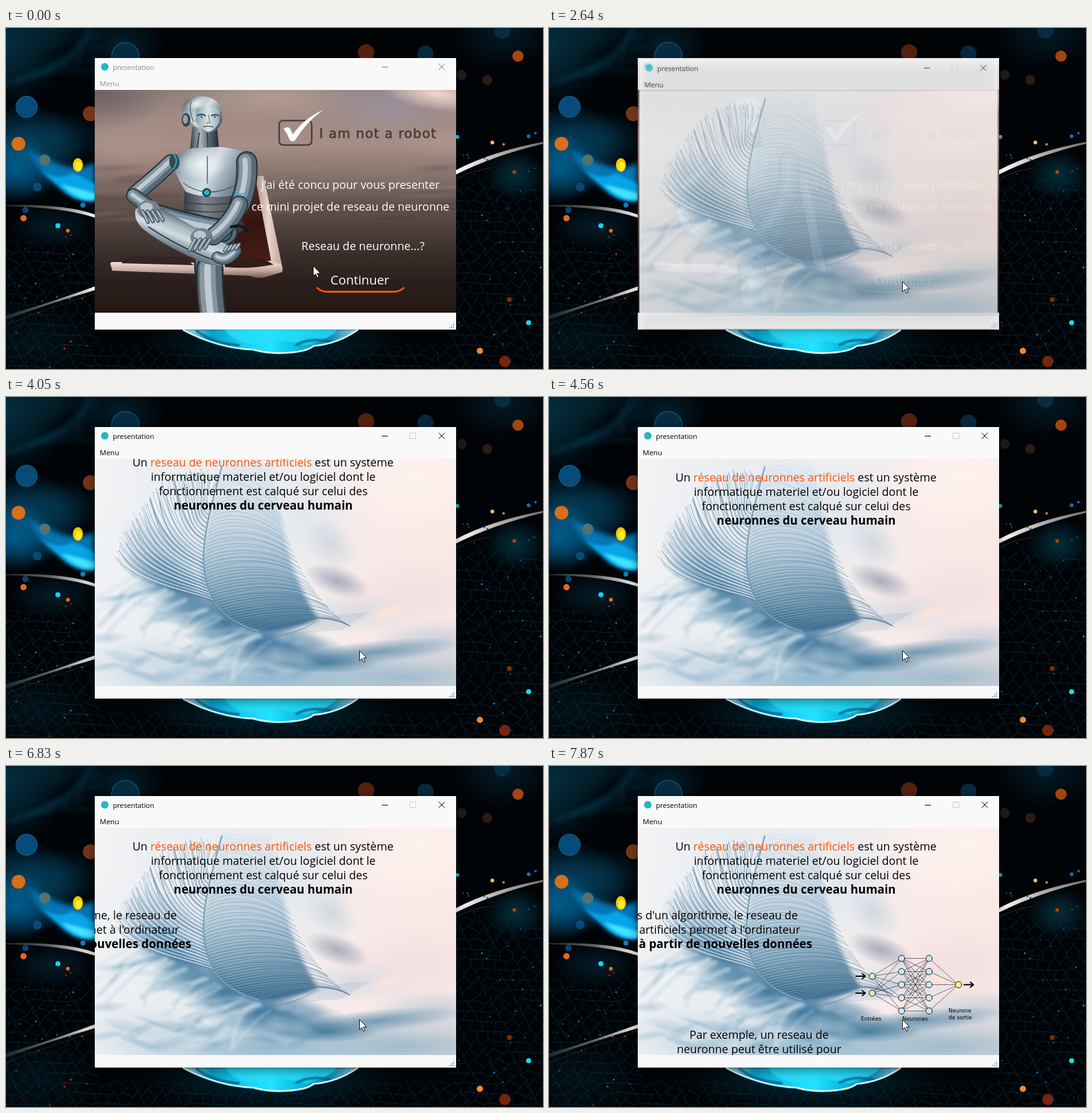
These frames come from a looping animation (859 by 545 pixels, 8 s). An HTML page with a canvas:

```html
<!DOCTYPE html>
<html lang="fr">
<head>
<meta charset="utf-8">
<title>presentation</title>
<style>
html, body { margin: 0; width: 100%; height: 100%; overflow: hidden; background: #020509; }
canvas { display: block; }
</style>
</head>
<body>
<canvas id="stage" width="859" height="545"></canvas>
<script>
const W = 859, H = 545, LOOP = 8000;
const SANS = '"Open Sans", "Noto Sans", sans-serif';
const WIDE = '"DejaVu Sans", sans-serif';
const view = document.getElementById('stage').getContext('2d');
let g = view;

const STEPS = [0, 140, 260, 380, 530, 1400, 1530, 1680, 2520, 2640, 2760, 2880, 3000, 3120, 3270,
  3390, 3510, 3660, 3810, 3930, 4050, 4200, 4320, 4440, 4560, 5650, 5800, 5920, 6040, 6190, 6310,
  6430, 6550, 6670, 6830, 6970, 7090, 7240, 7360, 7480, 7630, 7750, 7870];

function layer(paint) {
  const c = document.createElement('canvas');
  c.width = W; c.height = H;
  g = c.getContext('2d');
  paint();
  g = view;
  return c;
}
function seeded(s) {
  return () => (s = (s * 16807) % 2147483647) / 2147483647;
}
function fill(d, color) { g.fillStyle = color; g.fill(new Path2D(d)); }
function line(d, color, w = 1) {
  g.strokeStyle = color; g.lineWidth = w; g.lineCap = g.lineJoin = 'round';
  g.stroke(new Path2D(d));
}
function blurred(px, paint) {
  g.save(); g.filter = `blur(${px}px)`;
  paint();
  g.restore();
}
function disc(x, y, r, color, ry = r) {
  g.fillStyle = color;
  g.beginPath(); g.ellipse(x, y, r, ry, 0, 0, 7); g.fill();
}
// Soft ellipse; rgb is "r,g,b"
function glow(x, y, rx, ry, rgb, a = 1, rot = 0) {
  g.save();
  g.translate(x, y); g.rotate(rot); g.scale(rx, ry);
  const s = g.createRadialGradient(0, 0, 0, 0, 0, 1);
  s.addColorStop(0, `rgba(${rgb},${a})`);
  s.addColorStop(.5, `rgba(${rgb},${a * .55})`);
  s.addColorStop(1, `rgba(${rgb},0)`);
  g.fillStyle = s; g.fillRect(-1, -1, 2, 2);
  g.restore();
}
function ramp(x0, y0, x1, y1, ...colors) {
  const s = g.createLinearGradient(x0, y0, x1, y1);
  colors.forEach((c, i) => s.addColorStop(i / (colors.length - 1), c));
  return s;
}
function text(str, x, y, size, color = '#000', align = 'left', font = SANS, weight = 400) {
  g.font = `${weight} ${size}px ${font}`;
  g.fillStyle = color; g.textAlign = align;
  g.fillText(str, x, y);
}
function clipTo(x, y, w, h) { g.beginPath(); g.rect(x, y, w, h); g.clip(); }
function bez(a, b, c, d, u) {
  const v = 1 - u;
  return [0, 1].map(i => v*v*v*a[i] + 3*v*v*u*b[i] + 3*v*u*u*c[i] + u*u*u*d[i]);
}

// Honeycomb, warped so that neighbouring cells share their corners
function paintCells() {
  const r = 11;
  for (let row = 0; row < 20; row++) for (let c = 0; c < 46; c++) {
    const x = (c + (row % 2) / 2) * r * 1.732, y = 235 + row * r * 1.5;
    if (x < 150 ? y < 335 : x > 710 ? y < 240 : y < 500) continue;
    let d = '';
    for (let k = 0; k < 6; k++) {
      const a = (k + .5) * Math.PI / 3, px = x + Math.cos(a) * r, py = y + Math.sin(a) * r;
      d += (k ? 'L' : 'M') + (px + 5 * Math.sin(px * .17 + py * .31)) + ' ' + (py + 4 * Math.sin(px * .29 - py * .13));
    }
    line(d + 'Z', 'rgba(12,58,76,.28)', 1.2);
  }
}

function paintWall() {
  const rnd = seeded(77);
  g.fillStyle = '#010407'; g.fillRect(0, 0, W, H);
  glow(0, 25, 100, 100, '4,62,86', .75);
  glow(70, 0, 90, 45, '4,45,62', .6);
  glow(30, 195, 90, 75, '4,82,122', .9);
  glow(15, 225, 70, 55, '0,105,160', .75);
  glow(85, 178, 70, 45, '4,58,84', .7);
  glow(185, 25, 70, 45, '3,40,56', .7);
  glow(75, 318, 70, 35, '3,38,54', .7);
  glow(815, 235, 50, 40, '6,58,76', .75);
  glow(795, 5, 80, 60, '4,42,58', .6);
  glow(40, 500, 110, 60, '3,26,36', .6);
  glow(425, 500, 210, 55, '2,45,62', .8);
  paintCells();
  blurred(4, () => {
    for (let i = 0; i < 6; i++)
      line(`M${-10 + i * 25} ${95 - i * 8}Q${60 + i * 10} ${60 - i * 4} 150 ${70 - i * 20}`, 'rgba(10,70,98,.3)', 7);
    fill('M35 195Q70 215 100 222Q125 225 142 215V278Q105 275 80 250Q55 235 35 195Z', '#0676b5');
  });
  blurred(2, () => {
    fill('M55 226Q85 246 106 232Q124 238 142 250V276Q112 279 92 260Z', '#08a4e8');
    fill('M88 250Q110 255 142 264V274Q116 278 88 250Z', '#43e4ff');
  });

  // light trails
  const pale = ramp(0, 0, 142, 0, '#17262f', '#5f6567', '#f5f2f0');
  blurred(.7, () => {
    fill('M0 283Q95 281 142 298V303Q88 286 0 285Z', pale);
    fill('M0 459Q62 442 142 413V419Q70 440 0 466Z', pale);
    line('M0 474Q70 448 142 424', 'rgba(80,80,82,.35)', 1);
    fill('M720 227Q775 198 859 182V185Q780 204 720 234Z', ramp(720, 0, 859, 0, '#ffffff', '#b3aead', '#77706e'));
    line('M720 241Q745 228 775 224', 'rgba(55,75,85,.4)', 1.5);
  });
  // crescent below the window
  blurred(1, () => {
    fill('M282 482Q335 513 395 515Q415 522 450 520Q482 518 492 509Q530 506 564 482Z',
      ramp(282, 0, 564, 0, '#b5dfea', '#079ec9', '#18c9f0', '#22e5ff', '#08b8df', '#0b87b4', '#9fd5df'));
    fill('M350 482Q365 505 400 505L440 499L480 507Q520 497 530 482Z', 'rgba(40,225,250,.75)');
    line('M305 484Q330 504 372 507M520 502Q490 494 465 506', 'rgba(0,82,120,.75)', 4);
  });
  line('M284 483Q340 512 396 514Q420 521 450 519Q482 517 492 508Q530 505 562 483', '#e6faff', 2.5);

  const blue = 'rgba(8,80,125,.85)', dim = 'rgba(6,48,70,.85)', rust = '#a4460f';
  const orbs = [
    [33, 126, 17, '#064b79'], [191, 45, 22, dim], [135, 137, 12, '#74361a'], [20, 185, 11, '#d96e1b'],
    [62, 211, 9, '#57716f'], [50, 254, 7, blue], [28, 304, 5, '#e2691a'], [83, 316, 4, '#12d2f5'],
    [99, 324, 3, '#f06a14'], [31, 291, 5, blue], [123, 283, 4, '#0d7fc0'], [576, 39, 13, '#54200e'],
    [671, 41, 13, dim], [794, 4, 13, dim], [819, 45, 9, rust], [770, 83, 8, '#2c1b15'],
    [729, 75, 8, '#211a18'], [778, 183, 3, '#ffc06a'], [796, 186, 2, '#d88642'], [836, 173, 3, '#0c73b5'],
    [847, 168, 2, '#0c73b5'], [722, 174, 3, '#0bbbe0'], [813, 230, 3, rust], [836, 471, 4, '#12dcf2'],
    [758, 516, 5, '#f08a30'], [798, 533, 9, '#7c230b'], [805, 434, 4, '#7a2b10']
  ];
  blurred(.6, () => {
    for (const [x, y, r, c] of orbs) {
      disc(x, y, r, c);
      if (r > 16) { g.strokeStyle = 'rgba(22,112,168,.6)'; g.lineWidth = 1.5; g.stroke(); }
    }
    disc(115, 219, 8, '#ffc800', 11);
    disc(116, 221, 5, '#fff02a', 7);
    for (let i = 0; i < 80; i++) {
      const side = i % 2, x = side ? 722 + rnd() * 137 : rnd() * 142;
      const y = side ? 200 + rnd() * 345 : 330 + rnd() * 215;
      disc(x, y, .5 + rnd() * 1.2, ['#a8441a', '#0d5f80', '#6b2f18', '#147896'][i % 4]);
    }
  });
}

function metal(x0, y0, x1, y1) {
  return ramp(x0, y0, x1, y1, '#4a5a66', '#a7b5be', '#d3dde3', '#7c8e9a', '#35434e');
}
function tube(d, w) {
  line(d, '#252e35', w);
  line(d, '#566a78', w * .88);
  g.save(); g.translate(-w * .08, -w * .08);
  line(d, '#8496a2', w * .58);
  line(d, '#bfcbd2', w * .24);
  g.restore();
}
function hand(x, y, dx) {
  disc(x, y, 18, '#72848f', 15);
  disc(x - 3, y - 4, 10, '#b9c6ce', 7);
  for (let i = 0; i < 4; i++)
    tube(`M${x - 10 + i * 8} ${y + 3}q${dx * 5} 7 ${dx * 9} ${17 - i}`, 6);
}

function paintRobot() {
  // chair
  fill('M398 240Q404 234 412 237L442 382L430 393L418 380Z', ramp(395, 0, 445, 0, '#9b8580', '#ead5cc', '#b79b93'));
  fill('M392 255L401 250L424 372L358 376Q372 310 392 255Z', ramp(380, 250, 410, 380, '#592a22', '#35130f', '#4a1f18'));
  fill('M167 377Q166 374 172 374L435 376Q444 378 442 390L412 399Q400 400 390 396L170 388Z',
    ramp(0, 374, 0, 400, '#efe0da', '#c7aba2', '#70564f'));
  fill('M185 376Q190 364 214 364L284 366L300 379Z', '#362320');
  fill('M350 376Q375 362 410 368L428 378Q390 386 350 382Z', '#321c18');
  // trunk and neck
  fill('M286 258L368 262Q370 290 384 322Q350 342 282 322Q284 290 286 258Z', ramp(284, 0, 384, 0, '#323c42', '#7b858b', '#555d62', '#272d31'));
  for (let y = 278; y < 318; y += 12) line(`M287 ${y}Q325 ${y + 8} 372 ${y}`, '#333b40', 1.5);
  fill('M298 158L338 162L341 196L294 198Z', ramp(296, 0, 340, 0, '#3c4850', '#a8b6bf', '#56646e', '#242c32'));
  line('M309 168L306 192M322 168L323 192', '#344049', 2);
  fill('M262 207Q282 198 298 192L342 190Q376 193 396 205L384 242Q376 263 362 268Q320 274 288 262Q273 240 262 207Z', metal(258, 195, 396, 265));
  glow(313, 218, 40, 26, '248,251,252', .85);
  line('M322 205V248M284 248Q300 260 320 262Q345 264 374 248', '#52636e', 1.5);
  disc(321, 263, 7, '#27343c'); disc(321, 263, 4.5, '#17b7d8');
  // legs
  tube('M350 326Q318 344 322 385', 42);
  tube('M326 385Q325 420 332 470', 44);
  line('M315 390Q309 425 316 455', '#b7926f', 2);
  tube('M344 324Q300 318 240 300', 38);
  fill('M207 290Q225 276 245 286Q300 318 360 350L352 378Q330 384 300 368Q246 344 218 320Q204 306 207 290Z', metal(270, 295, 245, 355));
  line('M228 318Q280 352 330 370', '#2c373e', 2);
  tube('M338 366Q354 376 368 356', 18);
  for (let i = 0; i < 4; i++) tube(`M${350 + i * 6} ${356 - i}l5 -7`, 6);
  // arms
  tube('M264 215Q240 238 207 265', 27);
  tube('M204 268L225 283', 24);
  disc(269, 213, 8, '#3b4852', 12);
  line('M268 201Q277 212 268 225', '#18b3d2', 2);
  hand(228, 290, 1);
  tube('M385 214Q388 250 374 282', 34);
  tube('M373 282Q362 310 332 333', 29);
  line('M360 318Q378 312 385 325', '#111619', 4);
  line('M366 262Q376 268 382 264', '#16b3cf', 2);
  hand(313, 335, -1);
  // head
  fill('M281 140Q279 110 312 109Q341 110 345 134L346 147Q343 158 334 165Q326 169 316 165Q303 159 297 151Q284 153 281 140Z', metal(282, 115, 347, 160));
  fill('M304 128Q321 121 342 131L341 151Q333 165 323 166Q309 160 303 149Z', ramp(304, 0, 344, 0, '#91a3af', '#dce4e8', '#8e9faa'));
  glow(304, 121, 17, 9, '255,255,255', .8, -.4);
  disc(288, 147, 7, '#384651', 11); disc(287, 146, 4, '#92a3ae', 7);
  line('M306 140Q313 136 319 140M329 140Q335 137 340 140', '#2d3a43', 2);
  disc(313, 142, 2, '#1d8fc4'); disc(334, 142, 2, '#1d8fc4');
  line('M324 139L326 151L321 152', '#667985', 1.3);
  line('M316 158Q323 156 331 158', '#48565f', 1.7);
  line('M296 118Q292 132 300 150', '#4c5c67', 1.2);
}

function paintIntro() {
  clipTo(142, 99, 578, 356);
  g.fillStyle = ramp(0, 99, 0, 455, '#917f7b', '#a18b84', '#a58e87', '#89756f', '#66554f', '#4d403b', '#382c29', '#291e1b', '#231814');
  g.fillRect(142, 99, 578, 356);
  glow(145, 105, 120, 60, '92,84,86', .7);
  glow(430, 110, 150, 40, '190,166,158', .7);
  glow(610, 125, 120, 45, '156,146,161', .8);
  glow(690, 105, 95, 28, '242,215,205', 1, .15);
  glow(700, 180, 90, 25, '176,149,143', .7);
  glow(200, 200, 110, 40, '180,151,140', .5);
  const rnd = seeded(12);
  for (let i = 0; i < 45; i++)
    glow(142 + rnd() * 578, 215 + rnd() * 95, 30 + rnd() * 55, 3 + rnd() * 5, i % 2 ? '160,135,126' : '64,53,49', .22, -.05);
  paintRobot();
  g.strokeStyle = '#493e3b'; g.lineWidth = 2.5;
  g.beginPath(); g.roundRect(437, 148, 52, 39, 6); g.stroke();
  fill('M444 161Q449 157 454 160L459 170Q476 145 507 131Q480 151 462 180Q457 183 454 179Q450 169 444 161Z', '#fff');
  g.letterSpacing = '1.2px';
  text('I am not a robot', 501, 176, 21, '#463b38', 'left', WIDE);
  g.strokeStyle = '#463b38'; g.lineWidth = .6;
  g.strokeText('I am not a robot', 501, 176);
  g.letterSpacing = '0px';
  text("j'ai été concu pour vous presenter", 551, 257, 18.1, '#fff', 'center');
  text('ce mini projet de reseau de neuronne', 551, 292, 18.1, '#fff', 'center');
  text('Reseau de neuronne...?', 571, 355, 18.1, '#fff', 'center');
  text('Continuer', 566, 410, 20.2, '#fff', 'center');
  line('M498 415.5Q504 421.5 514 421.5H620Q630 421.5 636 415.5', '#ff5a00', 3);
}

function paintFeather() {
  const rnd = seeded(5);
  clipTo(142, 99, 578, 363);
  g.fillStyle = ramp(142, 200, 720, 260, '#f1f2f4', '#e9edf1', '#eceef2', '#f8ebe9', '#f8e8e5');
  g.fillRect(142, 99, 578, 363);
  // blurred surroundings
  glow(660, 130, 140, 100, '255,243,240', .9);
  glow(475, 190, 80, 90, '224,230,237', .8);
  glow(650, 315, 120, 60, '240,219,222', .7);
  glow(530, 294, 55, 24, '154,157,177', .8, .35);
  glow(520, 235, 50, 35, '200,210,221', .7, .8);
  glow(560, 345, 100, 35, '208,214,225', .7);
  glow(610, 346, 36, 13, '255,230,218', .9, -.3);
  glow(690, 390, 110, 35, '190,203,216', .8);
  glow(640, 448, 230, 50, '163,188,204', 1);
  glow(420, 450, 250, 55, '150,186,207', 1);
  glow(230, 430, 130, 50, '205,219,229', .9);
  glow(590, 408, 140, 19, '103,147,175', .9, -.1);
  // dark root of the plume
  glow(255, 265, 90, 55, '112,156,184', .75, .75);
  glow(275, 305, 100, 38, '64,119,156', .9, .55);
  glow(345, 358, 120, 36, '56,115,155', .95, .3);
  glow(420, 396, 135, 38, '50,110,150', 1, .15);
  glow(510, 425, 90, 17, '62,116,151', .8);
  for (let i = 0; i < 60; i++) {
    const x = 160 + rnd() * 330, y = 385 + rnd() * 70;
    glow(x, y, 14 + rnd() * 26, 5 + rnd() * 8, i % 2 ? '226,236,242' : '92,145,178', .3, .5 - rnd());
  }
  blurred(2.5, () => {
    for (let i = 0; i < 60; i++) {
      const x = 185 + rnd() * 240, y = 275 + (x - 185) * .48;
      line(`M${x} ${y}q${-20 - rnd() * 25} ${5 + rnd() * 15} ${-40 - rnd() * 60} ${rnd() * 75}`,
        i % 2 ? 'rgba(240,245,248,.4)' : 'rgba(110,158,187,.28)', 2 + rnd() * 5);
    }
  });

  const quill = u => bez([345, 112], [315, 220], [278, 338], [405, 374], u);
  const edge = u => bez([428, 106], [440, 220], [470, 310], [550, 366], u);
  blurred(3, () => fill('M345 108L425 108Q437 200 458 270Q478 325 500 355Q440 382 392 371Q316 350 311 290Q316 220 345 108Z',
    ramp(345, 110, 375, 372, 'rgba(224,233,239,.6)', 'rgba(203,218,228,.8)', 'rgba(170,196,212,.85)', 'rgba(118,157,182,.9)', 'rgba(58,107,142,.95)')));
  // right vane: barbs arch away from the shaft, then droop to the edge
  for (let i = 0; i < 110; i++) {
    const u = i / 110, [x, y] = quill(u), [ex, ey] = edge(Math.min(1, u + .08 + rnd() * .03));
    const dark = `rgba(48,95,130,${.08 + u * .5})`, light = `rgba(240,245,248,${.42 - u * .2})`;
    line(`M${x} ${y}C${x + 25} ${y - 32 * (1 - u)} ${ex - 55} ${ey - 48 + u * 18} ${ex} ${ey}`, i % 2 ? dark : light, .9);
  }
  // left vane: barbs leave low on the shaft and curl upwards
  for (let i = 0; i < 130; i++) {
    const u = i / 130, [x, y] = quill(.18 + u * .55);
    const [tx, ty] = bez([332, 118], [255, 100], [205, 170], [168, 255], u);
    const j = rnd() * 16, bx = tx + 14 + u * 22, by = y - 30 + u * 5;
    line(`M${x} ${y}C${x - 22} ${y - 12} ${bx} ${by} ${tx + j} ${ty + j}`,
      i % 5 < 2 ? 'rgba(238,243,247,.65)' : `rgba(66,116,150,${.28 + rnd() * .3})`, .6 + rnd() * .9);
  }
  for (let i = 0; i < 14; i++)
    line(`M${430 + i * 4} ${383 - i}Q490 ${375 - i * 2} ${540 + i * 3} ${371 - i * 2}`, 'rgba(79,123,153,.3)', .7);
  line('M345 112C315 220 278 338 405 374', 'rgba(94,139,168,.8)', 2.5);
  line('M344 112C314 220 277 338 404 374', 'rgba(225,236,242,.6)', .8);
}

function paintFrame(active) {
  const ink = active ? '#000' : '#8b8b8b';
  g.save();
  if (active) { g.shadowColor = 'rgba(0,0,0,.45)'; g.shadowBlur = 16; g.shadowOffsetY = 4; }
  g.fillStyle = '#f9f9f9'; g.fillRect(142, 48, 578, 434);
  g.restore();
  disc(158, 62, 6, '#27b5c4');
  text('presentation', 171, 67, 11.1, ink);
  text('Menu', 150, 93, 11.5, active ? '#000' : '#8b948f');
  line('M601.5 62.5H610.5M692.5 57.5L701.5 66.5M701.5 57.5L692.5 66.5', active ? '#000' : '#777', 1);
  if (active) line('M646.5 57.5H655.5V66.5H646.5Z', '#cccccc');
  g.fillStyle = '#a8a8a8';
  for (let r = 0; r < 3; r++) for (let c = 2 - r; c < 3; c++) g.fillRect(709 + c * 3, 472 + r * 3, 2, 2);
}

function paintNet() {
  const rows = [307.5, 328.5, 349.5, 370.5, 391.5];
  const col = (x, ys) => ys.map(y => [x, y]);
  const cols = [col(517, [336, 363]), col(564, rows), col(608, rows), col(655, [349.5])];
  const tints = ['#c9f3bf', '#c9e8fb', '#c9e8fb', '#fff68c'];
  for (let i = 0; i < 3; i++)
    for (const a of cols[i]) for (const b of cols[i + 1]) line(`M${a}L${b}`, '#1a1a1a', .6);
  cols.forEach((nodes, i) => nodes.forEach(([x, y]) => {
    disc(x, y, 5, tints[i]);
    g.strokeStyle = '#111'; g.lineWidth = 1; g.stroke();
  }));
  for (const [x, y] of [[491, 336], [491, 363], [664, 349.5]])
    line(`M${x} ${y}h15m-5 -4l5 4l-5 4`, '#000', 2);
  text('Entrées', 499, 407, 8.6, '#000', 'left', WIDE);
  text('Neurones', 565, 407, 8.6, '#000', 'left', WIDE);
  text('Neurone', 639, 394, 8.6, '#000', 'left', WIDE);
  text('de sortie', 639, 405, 8.6, '#000', 'left', WIDE);
}

function drawTexts(t) {
  // definition drops from the top
  const y = Math.round(135 + Math.min(0, (t - 4466) * .0577));
  const parts = [['Un ', '#000'], ['réseau de neuronnes artificiels', '#ff5500'], [' est un système', '#000']];
  g.font = `400 18px ${SANS}`;
  let x = 411 - g.measureText(parts.map(p => p[0]).join('')).width / 2;
  for (const [s, c] of parts) {
    text(s, x, y, 18, c);
    x += g.measureText(s).width;
  }
  text('informatique materiel et/ou logiciel dont le', 411.5, y + 23, 18, '#000', 'center');
  text('fonctionnement est calqué sur celui des', 411.5, y + 46, 18, '#000', 'center');
  text('neuronnes du cerveau humain', 411.5, y + 69, 18.75, '#000', 'center', SANS, 700);
  // explanation enters from the left
  const dx = (t - 7870) * .12;
  text("Au moyens d'un algorithme, le reseau de", 398 + dx, 245, 18, '#000', 'right');
  text("neuronnes artificiels permet à l'ordinateur", 402 + dx, 268, 18, '#000', 'right');
  text("d'apprendre à partir de nouvelles données", 421 + dx, 291, 18.75, '#000', 'right', SANS, 700);
  // example rises from the bottom
  const up = Math.round(436 - (t - 7870) * .0577);
  text('Par exemple, un reseau de', 336, up, 18, '#000', 'center');
  text('neuronne peut être utilisé pour', 336, up + 23, 18, '#000', 'center');
}

function drawCursor(t) {
  const stops = [[0, 491, 380], [140, 503, 385], [260, 517, 390], [380, 530, 395], [530, 535, 396],
    [1400, 550, 401], [1530, 562, 404], [1680, 565, 405]];
  const [, x, y] = stops.filter(s => s[0] <= t).pop();
  const pointing = t >= 260 && t < 2640;
  g.save();
  g.translate(x, y);
  const d = pointing
    ? 'M-2 14V2Q-2 .5 0 .5Q2 .5 2 2V8Q5 6.500 6 9Q9 7.500 10 10Q12 9.500 12 12V17Q11 20 10 23H1Q-1 19 -5 14Q-6 11 -3 12Z'
    : 'M.5 .5V16.500L4.200 13L6.800 18.800L9.200 17.700L6.700 12H11.500Z';
  fill(d, '#fff'); line(d, '#111', 1);
  if (pointing) line('M2 8V12M6 9V12M9.500 10V13', '#222', .8);
  g.restore();
}

const wall = layer(paintWall), intro = layer(paintIntro), feather = layer(paintFeather);

function render(t) {
  g.drawImage(wall, 0, 0);
  if (t < 2880) {
    paintFrame(false);
    g.drawImage(intro, 0, 0);
  }
  if (t >= 2520) {
    const p = Math.min(1, (t - 2400) / 360), k = 1 - .08 * (1 - p) ** 2;
    g.save();
    g.globalAlpha = p;
    g.translate(431, 265); g.scale(k, k); g.translate(-431, -265);
    paintFrame(true);
    g.drawImage(feather, 0, 0);
    clipTo(142, 99, 578, 363);
    drawTexts(t);
    if (t >= 7240) paintNet();
    g.restore();
  }
  drawCursor(t);
}

function tick() {
  const now = performance.now() % LOOP;
  render(STEPS.filter(s => s <= now).pop());
  requestAnimationFrame(tick);
}
tick();
</script>
</body>
</html>
```
